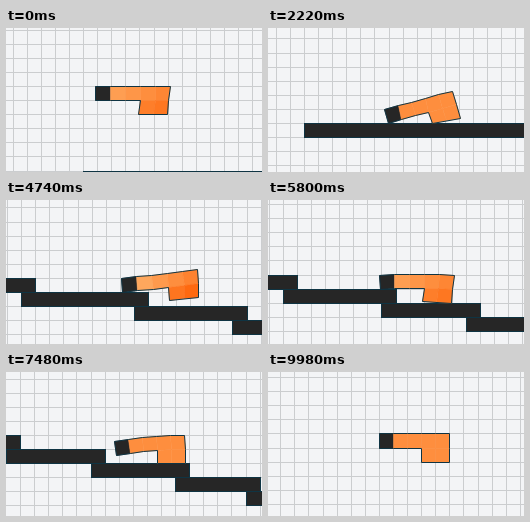
Animation, 256 px wide and 144 px high, one loop 10000 ms. Source, as an HTML page with a canvas:

```html
<!DOCTYPE html>
<html lang="en">
<head>
<meta charset="utf-8">
<title>Soft robot walking down steps</title>
<style>
html, body { margin: 0; width: 100%; height: 100%; overflow: hidden; background: #f3f4f6; }
canvas { display: block; width: 256px; height: 144px; }
</style>
</head>
<body>
<canvas id="stage" width="256" height="144"></canvas>
<script>
const ctx = document.getElementById('stage').getContext('2d');
const U = 14.09, LOOP = 10000, RESET = 9980, LANDING = 650;
const OUTLINE = '#0f3443', DARK = '#262626';

// Steps get shorter, overlap the next one by a block and drop by one block each.
const steps = [{ x: 0, width: 17 }];
for (let i = 1; i < 11; i++) {
  const last = steps[i - 1];
  steps.push({ x: last.x + last.width - 1, width: Math.ceil(9 * i ** -0.27) });
}

// Camera offset, head position on screen and body shape (angles in radians).
const key = (t, ox, oy, x, tilt = 0, lean = 0, stretch = 1, bend = 0) =>
  ({ t, ox, oy, x, tilt, lean, stretch, bend });
const keys = [
  key(0, 77.1, 142.55, 89, 0, -0.1, 1.06),
  key(LANDING, 73, 95, 89, -0.26, 0.3),
  key(2220, 36, 95, 116, -0.26, 0.3),
  key(3700, -94.4, 95, 118, -0.13, 0.17, 1.13, -0.044),
  key(5800, -323.36, 60.42, 111, -0.04, -0.1, 1.06, 0.02),
  key(7480, -436.8, 34.7, 108, -0.14, 0.03, 1, 0.027),
  key(8800, -532.4, 20.6, 116, -0.216, 0.07, 1.06),
  key(RESET, -620, 4.4, 112, -0.04, -0.1, 1.06)
];
const start = key(RESET, 96.8, 146, 96.8 + U);

const lerp = (a, b, k) => a + (b - a) * k;
const mix = (p, q) => [lerp(p[0], q[0], 0.5), lerp(p[1], q[1], 0.5)];
const polar = ([x, y], angle, length) =>
  [x + Math.cos(angle) * length, y + Math.sin(angle) * length];

function slope(i) {
  const a = keys[Math.max(i - 1, 0)], b = keys[Math.min(i + 1, keys.length - 1)];
  return (b.ox - a.ox) / (b.t - a.t);
}

function cameraX(i, k) {
  const a = keys[i], b = keys[i + 1], d = b.t - a.t, r = 1 - k;
  return a.ox * (1 + 2 * k) * r * r + b.ox * k * k * (3 - 2 * k)
    + d * k * r * (slope(i) * r - slope(i + 1) * k);
}

function stateAt(t) {
  if (t >= RESET) return { ...start, hover: 4 * U };
  let i = 0;
  while (t >= keys[i + 1].t) i++;
  const a = keys[i], b = keys[i + 1], k = (t - a.t) / (b.t - a.t);
  const state = {};
  for (const name in a) state[name] = lerp(a[name], b[name], k);
  state.ox = cameraX(i, k);
  state.hover = 0;
  if (t < LANDING) {
    state.oy = lerp(a.oy, b.oy, k * k);
    state.hover = 4 * U * (1 - k * k);
  } else {
    const cycles = Math.round((b.t - a.t) / 500);
    const rock = 0.1 * Math.sin(2 * Math.PI * cycles * k);
    state.tilt += rock;
    state.lean -= rock;
  }
  return state;
}

// Surface height with a soft drop just past each edge.
function ground(x) {
  let y = 0;
  for (const s of steps) y += U * Math.min(1, Math.max(0, x / U - s.x - s.width));
  return y;
}

// Rows of lattice points: back, belly and sole, resting on the ground or hovering.
function bodyShape({ ox, oy, x, tilt, lean, stretch, bend, hover }) {
  const down = Math.PI / 2;
  const top = [[x, 0]];
  for (let i = 0; i < 5; i++) top.push(polar(top[i], tilt + bend * i, U * stretch));
  const mid = top.map((p, i) => i < 5
    ? polar(p, down + tilt + bend * i, U)
    : polar(p, down - lean, U));
  const heel = polar(mid[3], down - lean, U * (1 + 0.6 * tilt));
  const toe = polar(mid[5], down - lean, U);
  const rows = [top, mid, [heel, mix(heel, toe), toe]];
  const drop = Math.min(...rows.flat().map(([px, py]) => ground(px - ox) + oy - py)) - hover;
  return rows.map(row => row.map(([px, py]) => [px, py + drop]));
}

function trace(points) {
  ctx.beginPath();
  points.forEach(([x, y]) => ctx.lineTo(Math.round(x) + 0.5, Math.round(y) + 0.5));
  ctx.closePath();
}

function drawGrid(ox, oy) {
  ctx.fillStyle = '#f3f4f6';
  ctx.fillRect(0, 0, 256, 144);
  ctx.fillStyle = '#cbcdcf';
  const first = v => ((v % U) + U) % U;
  for (let x = first(ox); x < 256; x += U) ctx.fillRect(Math.round(x), 0, 1, 144);
  for (let y = first(oy); y < 144; y += U) ctx.fillRect(0, Math.round(y), 256, 1);
}

function drawSteps(ox, oy) {
  const boxes = steps.map((s, i) => {
    const [left, right, top, bottom] =
      [ox + s.x * U, ox + (s.x + s.width) * U, oy + i * U, oy + (i + 1) * U].map(Math.round);
    return [left, top, right - left, bottom - top];
  });
  ctx.fillStyle = OUTLINE;
  boxes.forEach(([x, y, w, h]) => ctx.fillRect(x, y, w + 1, h + 1));
  ctx.fillStyle = DARK;
  boxes.forEach(([x, y, w, h]) => ctx.fillRect(x + 1, y + 1, w - 1, h - 1));
}

function drawRobot(state) {
  const [top, mid, low] = bodyShape(state);
  const cells = [0, 1, 2, 3, 4].map(i => [top[i], top[i + 1], mid[i + 1], mid[i]]);
  for (const i of [0, 1]) cells.push([mid[i + 3], mid[i + 4], low[i + 1], low[i]]);
  ctx.lineWidth = 0.5;
  cells.forEach((cell, i) => {
    const light = (state.stretch - 1) * 130 * (3 - i);
    ctx.fillStyle = i ? `rgb(254,${142 + light},${62 + light * 1.25})` : DARK;
    ctx.strokeStyle = ctx.fillStyle;
    trace(cell);
    ctx.fill();
    ctx.stroke();
  });
  ctx.lineWidth = 1;
  ctx.strokeStyle = OUTLINE;
  trace([...top, mid[5], low[2], low[0], mid[3], mid[2], mid[1], mid[0]]);
  ctx.stroke();
}

function draw() {
  const t = Math.floor((performance.now() % LOOP) / 20) * 20;
  const state = stateAt(t);
  drawGrid(state.ox, state.oy);
  drawSteps(state.ox, state.oy);
  drawRobot(state);
  requestAnimationFrame(draw);
}
draw();
</script>
</body>
</html>
```
